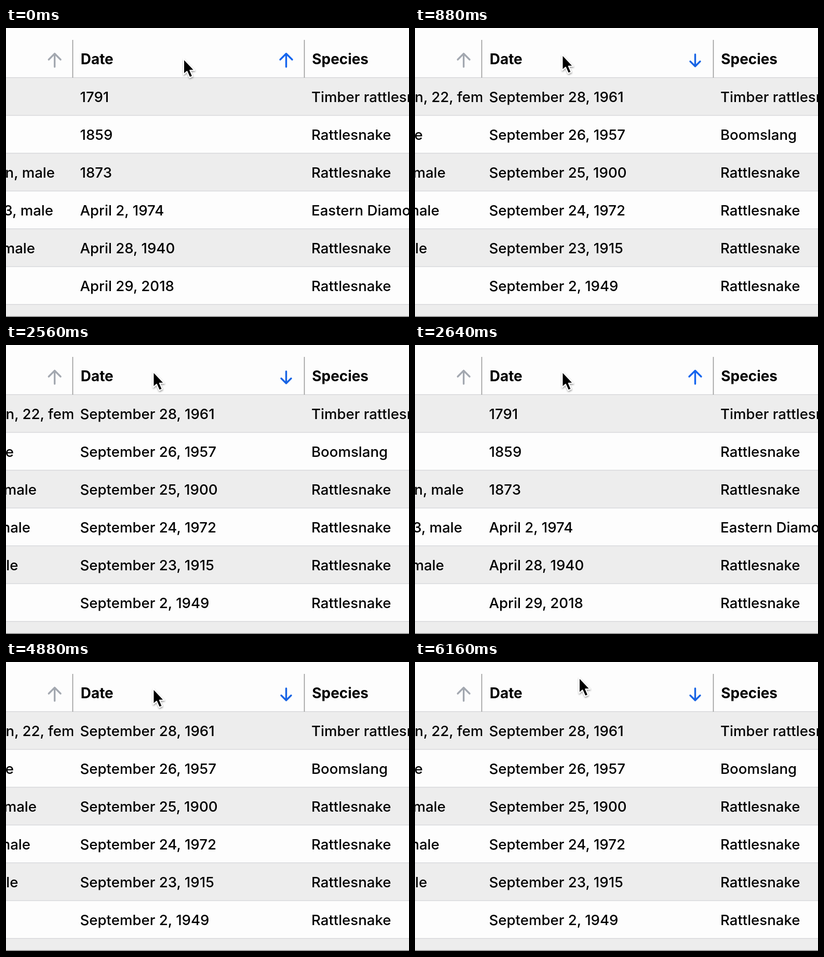
Animation, 776 px wide and 558 px high, one loop 6720 ms. Source, as an HTML page:

```html
<!DOCTYPE html>
<html lang="en">
<head>
<meta charset="utf-8">
<title>Sortable table</title>
<style>
html, body { margin: 0; width: 100%; height: 100%; overflow: hidden; background: #fdfdfd; }
svg { display: block; width: 776px; height: 558px; }
text { font: 450 27.6px Inter, "Liberation Sans", sans-serif; font-optical-sizing: none; fill: #000; white-space: pre; }
.head { font-weight: 700; font-size: 27.9px; }
.arrow { fill: none; stroke-width: 3.4; stroke-linecap: round; stroke-linejoin: round; }
</style>
</head>
<body>
<svg id="stage" viewBox="0 0 776 558">
  <defs>
    <clipPath id="cell"><rect width="129.5" height="558"/></clipPath>
    <filter id="shade" x="-50%" y="-50%" width="220%" height="220%">
      <feDropShadow dx="0.5" dy="2" stdDeviation="1.8" flood-opacity="0.4"/>
    </filter>
  </defs>
  <rect width="776" height="558" fill="#fdfdfd"/>
  <g id="bands"></g>
  <path d="M128.5 23V96M574.5 23V96" stroke="#999" stroke-width="1.6"/>
  <rect y="556.6" width="776" height="1.4" fill="#7c7c7c"/>
  <text class="head" x="143.8" y="69.5">Date</text>
  <text class="head" x="589.3" y="69.5">Species</text>
  <path class="arrow" stroke="#a3a8b0" d="M93.700 75V49.500M82.300 61L93.700 49.500L105.100 61"/>
  <path id="sort" class="arrow"/>
  <g id="rows"></g>
  <path id="cursor" filter="url(#shade)" fill="#000" stroke="#fff" stroke-width="2" stroke-linejoin="round"
    d="M0 -1V29L6.500 23.300L11.600 35L17.200 32.600L12.200 21.200H21Z"/>
</svg>
<script>
const LOOP = 6720, STEP = 80, ROW = 73, TOP = 96;
const $ = id => document.getElementById(id);

// Each row: [end of the clipped left cell, its right edge, date, species]
const up = [
  ['', 0, '1791', 'Timber rattlesnake'],
  ['', 0, '1859', 'Rattlesnake'],
  ['n, male', 94, '1873', 'Rattlesnake'],
  ['3, male', 91, 'April 2, 1974', 'Eastern Diamondback'],
  ['male', 56, 'April 28, 1940', 'Rattlesnake'],
  ['', 0, 'April 29, 2018', 'Rattlesnake']
];
const down = [
  ['an, 22, fem', 131.5, 'September 28, 1961', 'Timber rattlesnake'],
  ['male', 15, 'September 26, 1957', 'Boomslang'],
  ['male', 59, 'September 25, 1900', 'Rattlesnake'],
  ['male', 47, 'September 24, 1972', 'Rattlesnake'],
  ['male', 23.5, 'September 23, 1915', 'Rattlesnake'],
  ['', 0, 'September 2, 1949', 'Rattlesnake']
];
const rowMarkup = ([left, edge, date, species], i) => {
  const y = TOP + i * ROW + 46.5;
  return `<g clip-path="url(#cell)"><text x="${edge}" y="${y}" text-anchor="end">${left}</text></g>` +
    `<text x="142.5" y="${y}">${date}</text><text x="588" y="${y}">${species}</text>`;
};
const views = {
  up: { rows: up.map(rowMarkup).join(''), color: '#1464ee', arrow: 'M539.500 75V49.500M528 61L539.500 49.500L551 61' },
  down: { rows: down.map(rowMarkup).join(''), color: '#1763e4', arrow: 'M539.500 51V74M530 64.500L539.500 74L549 64.500' }
};

let bands = '';
for (let i = 0; i < 7; i++) {
  const y = TOP + i * ROW;
  bands += `<rect y="${y}" width="776" height="${ROW}" fill="${i % 2 ? '#fdfdfd' : '#ededed'}"/>` +
    `<rect y="${y - 1}" width="776" height="1.400" fill="#d6d7da"/>`;
}
$('bands').innerHTML = bands;

// Pointer moves: [start, end, x, y]
const home = [342, 60.5];
const moves = [
  [0, 320, 283.5, 52.5],
  [5200, 5680, 304.5, 37.5],
  [5840, 6160, 316, 31]
];
const ease = p => p * p * (3 - 2 * p);

function pointer(t) {
  let [x, y] = home;
  for (const [a, b, nx, ny] of moves) {
    const k = ease(Math.min(1, Math.max(0, (t - a) / (b - a))));
    x += (nx - x) * k;
    y += (ny - y) * k;
  }
  return [x, y];
}

let shown;
function draw(now) {
  const t = Math.floor((now % LOOP) / STEP) * STEP;
  const name = (t >= 880 && t < 2640) || t >= 4880 ? 'down' : 'up';
  if (name !== shown) {
    const view = views[shown = name];
    $('rows').innerHTML = view.rows;
    $('sort').setAttribute('d', view.arrow);
    $('sort').setAttribute('stroke', view.color);
  }
  $('cursor').setAttribute('transform', `translate(${pointer(t)})`);
}

const start = performance.now();
function tick() {
  draw(performance.now() - start);
  requestAnimationFrame(tick);
}
draw(0);
requestAnimationFrame(tick);
</script>
</body>
</html>
```
